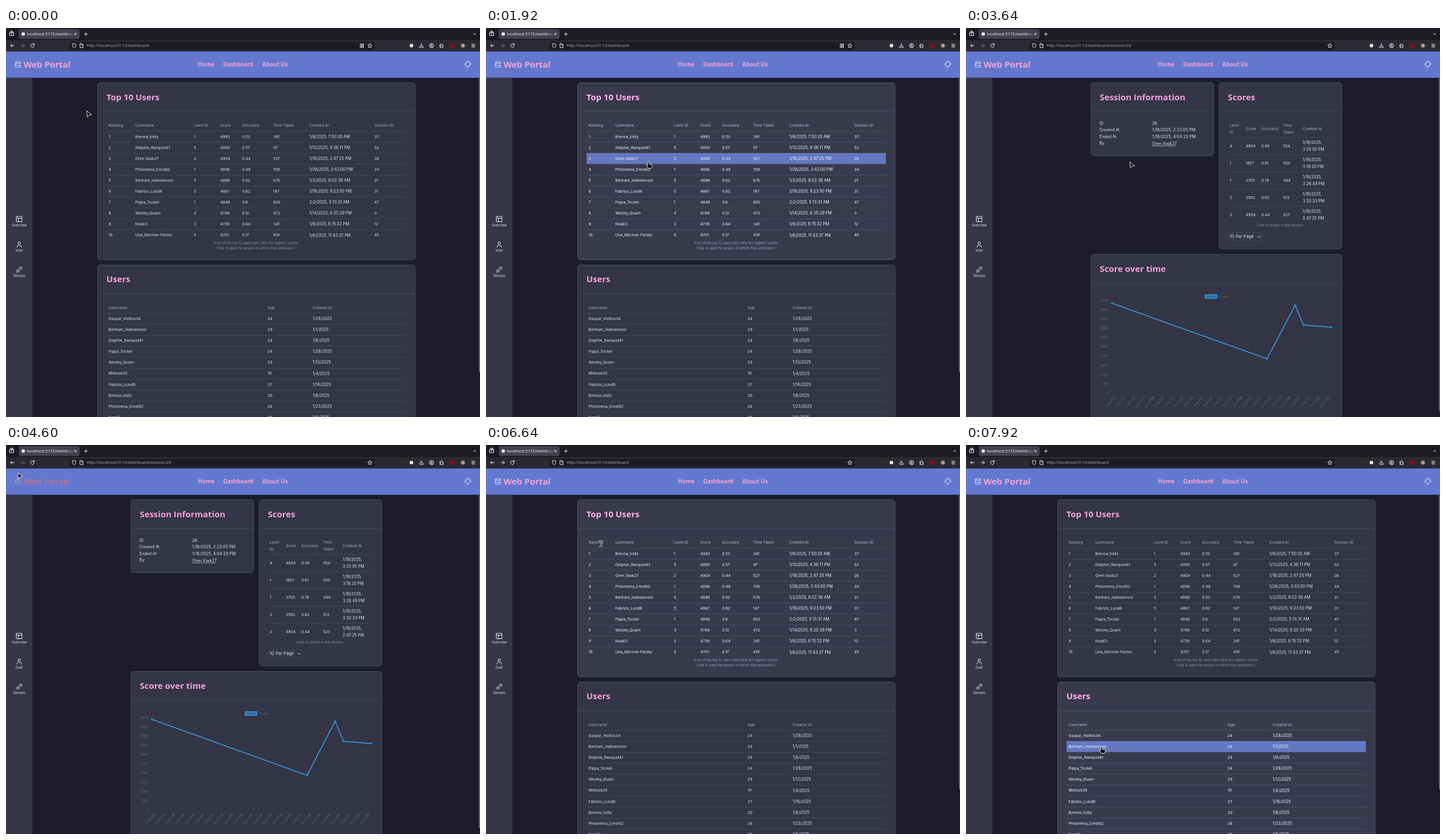
These frames come from a looping animation (825 by 678 pixels, 8000 ms). An HTML page:

```html
<!DOCTYPE html>
<html lang="en">
<head>
<meta charset="utf-8">
<title>Web Portal</title>
<style>
  html, body { margin: 0; width: 100%; height: 100%; overflow: hidden; background: #1c1c2b; }
  svg { display: block; width: 100%; height: 100%; }
  text { font-family: Inter, "Open Sans", sans-serif; white-space: pre; }
  .title { font-family: "Open Sans", "Noto Sans", sans-serif; font-weight: 700; }
  .ui { font-family: "Noto Sans", "Open Sans", sans-serif; }
  .axis { font-family: "Liberation Sans", Arial, sans-serif; }
  .icon { fill: none; stroke: #ececf2; stroke-width: 1; stroke-linecap: round; stroke-linejoin: round; }
  .rule { stroke: #494b5d; stroke-width: .8; }
</style>
</head>
<body>
<svg id="stage" viewBox="0 0 825 678"></svg>
<script>
const LOOP = 8000, OPEN = 3000, BACK = 5420, CHART = 2960, ROW = 19.1;
const PINK = '#f2a2db', LIGHT = '#e1e3f0', MUTED = '#abaec1', DIM = '#8d90a5', BLUE = '#36a2eb';
const $ = id => document.getElementById(id);

// y is the middle of the capitals
const text = (x, y, s, size = 6.7, fill = LIGHT, more = '') =>
  `<text x="${x}" y="${y + size * .36}" font-size="${size}" fill="${fill}" ${more}>${s}</text>`;
const title = (x, y, s, size = 14.85) => text(x, y, s, size, PINK, 'class="title"');
const middle = (x, y, s, size, fill) => text(x, y, s, size, fill, 'text-anchor="middle"');
const rect = (x, y, w, h, fill, more = '') =>
  `<rect x="${x}" y="${y}" width="${w}" height="${h}" fill="${fill}" ${more}/>`;
const rule = (x1, y, x2) => `<line class="rule" x1="${x1}" y1="${y}" x2="${x2}" y2="${y}"/>`;
const icon = (d, more = '') => `<path class="icon" d="${d}" ${more}/>`;

const cards = {
  dash: [[159, 95, 553.5, 309.5], [159, 412.5, 553.5, 300]],
  session: [[217, 95, 214.5, 128], [440, 95, 214.5, 290.5], [217, 394, 437.5, 300]]
};
const card = (page, i, name, body) => {
  const [x, y, w, h] = cards[page][i];
  return `<g id="${page}${i}">` +
    rect(x + .5, y + .5, w - 1, h - 1, '#343546', 'rx="5" stroke="#4b4d60"') +
    rule(x, y + 51, x + w) + title(x + 15.8, y + 25.3, name) + body + '</g>';
};

const topUsers = `Brenna_Voltz|1|4983|0.53|391|1/9/2025, 7:50:20 AM|37
Delphie_Ranquot41|5|4950|0.57|97|1/12/2025, 4:36:11 PM|52
Oren.Vask27|2|4904|0.44|527|1/18/2025, 2:47:25 PM|26
Philomena_Crest62|1|4896|0.48|706|1/28/2025, 3:43:00 PM|24
Bertram_Hallowmoor|5|4888|0.02|670|1/3/2025, 8:02:36 AM|21
Fabrizo_Lund8|5|4867|0.82|147|1/19/2025, 9:23:50 PM|31
Pippa_Tockel|1|4846|0.6|602|2/2/2025, 5:13:31 AM|47
Wesley_Quarn|3|4748|0.12|472|1/14/2025, 6:25:29 PM|3
Noa63|2|4739|0.64|341|1/9/2025, 6:15:32 PM|12
Una_Morrow-Fenley|5|4701|0.17|419|1/8/2025, 11:43:37 PM|45`
  .split('\n').map((r, i) => [i + 1, ...r.split('|')]);
const users = `Gaspar_Hollins34|24|1/29/2025
Bertram_Hallowmoor|29|1/1/2025
Delphie_Ranquot41|24|1/6/2025
Pippa_Tockel|24|1/29/2025
Wesley_Quarn|29|1/12/2025
Melisse29|19|1/4/2025
Fabrizo_Lund8|27|1/16/2025
Brenna_Voltz|20|1/6/2025
Philomena_Crest62|26|1/23/2025
Noa63|25|1/5/2025`.split('\n').map(r => r.split('|'));

// clickable rows, filled while the tables are built
const hot = [];
function table(y, cols, heads, rows) {
  let out = heads.map((h, i) => text(cols[i], y - 10.2, h, 6.7, MUTED)).join('');
  rows.forEach((r, n) => {
    const top = y + n * ROW;
    out += rule(175, top, 696.5) +
      rect(175, Math.floor(top), 521, 19, '#5d6db1', `id="row${hot.length}" opacity="0"`) +
      r.map((s, i) => text(cols[i], top + 9.1, s, /\//.test(s) ? 6.95 : 6.7)).join('');
    hot.push(top);
  });
  return out;
}

const dashPage = card('dash', 0, 'Top 10 Users',
    table(180, [178.5, 225, 327, 373, 411, 465, 528, 641],
      ['Ranking', 'Username', 'Level ID', 'Score', 'Accuracy', 'Time Taken', 'Created At', 'Session ID'], topUsers) +
    middle(435.5, 375, 'A list of the top 10 users who have the highest scores.', 5.8, DIM) +
    middle(435.5, 383.5, 'Click to view the session in which they achieved it.', 5.8, DIM)) +
  card('dash', 1, 'Users', table(497.4, [178.5, 455.3, 533.8], ['Username', 'Age', 'Created At'], users));

const info = [['ID', '26'], ['Created At', '1/18/2025, 2:23:05 PM'],
  ['Ended At', '1/18/2025, 4:04:20 PM'], ['By', 'Oren.Vask27']]
  .map(([k, v], i) => text(232.3, 166.3 + i * 11.55, k, 6.9) + text(324, 166.3 + i * 11.55, v, 7.1)).join('') +
  '<line x1="324" x2="365" y1="205.6" y2="205.6" stroke="#c9cbdb" stroke-width=".7"/>';

const scores = [[4, 4804, 0.94, 554, '3:25:05'], [1, 1857, 0.81, 550, '3:19:20'],
  [1, 3705, 0.78, 494, '3:26:49'], [2, 3592, 0.82, 513, '3:32:33'], [2, 4904, 0.44, 527, '2:47:25']];
const sCols = [459, 487, 514, 552, 586];
const head = (i, y, s) => text(sCols[i], y, s, 6.6, MUTED);
const scoreTable = head(0, 169.8, 'Level') + head(0, 181.3, 'ID') + head(1, 175.5, 'Score') +
  head(2, 175.5, 'Accuracy') + head(3, 169.8, 'Time') + head(3, 181.3, 'Taken') + head(4, 175.5, 'Created At') +
  scores.map((r, n) => {
    const y = 205.3 + n * 30;
    return rule(455.5, y - 14.5, 639) +
      r.slice(0, 4).map((s, i) => text(sCols[i], y, s)).join('') +
      text(sCols[4], y - 5.8, '1/18/2025,', 6.9) + text(sCols[4], y + 5.8, r[4] + ' PM', 6.9);
  }).join('') +
  middle(547, 344.3, 'A list of scores in this session.', 5.8, DIM) +
  rect(455.5, 357, 59, 13, 'none', 'rx="2" stroke="#4b4d60" stroke-width=".8"') +
  text(459, 363.5, '10 Per Page', 7.5) + icon('M508.2 363l1.8 1.8 1.8-1.8', 'stroke-width=".8"');

const minutes = s => { const [h, m, sec] = s.split(':').map(Number); return h * 60 + m + sec / 60; };
const first = minutes('2:47:25'), perMin = 382 / (minutes('3:32:33') - first);
const timeX = m => 254 + (m - first) * perMin;
const points = scores.map(r => [timeX(minutes(r[4])), r[1]]).sort((a, b) => a[0] - b[0]);
const valueY = v => 635.5 - v * 160.5 / 5000;
const grid = d => `<path d="${d}" stroke="#000" stroke-opacity=".1" stroke-width=".45"/>`;
let chart = rect(416.5, 465, 20, 6, BLUE, `fill-opacity=".5" stroke="${BLUE}" stroke-width="1.4"`) +
  text(439.5, 468, 'Score', 6.1, '#666', 'class="axis"');
for (let v = 0; v <= 5000; v += 500) {
  const y = valueY(v);
  chart += grid(`M250 ${y}H636`) +
    text(248, y, v.toLocaleString('en-US'), 6.1, '#666', 'class="axis" text-anchor="end"');
}
for (let m = 168; m <= 212; m += 2) {
  const x = timeX(m), label = `${m / 60 | 0}:${String(m % 60).padStart(2, '0')} PM`;
  chart += grid(`M${x} 475V639.5`) + `<g transform="translate(${x} 643) rotate(-50)">` +
    text(0, 0, label, 6.1, '#666', 'class="axis" text-anchor="end"') + '</g>';
}
chart += `<path id="curve" fill="none" stroke="${BLUE}" stroke-width="1.5" stroke-linejoin="round"/>` +
  points.map((p, i) => `<circle id="dot${i}" cx="${p[0]}" fill="#2b74aa" stroke="${BLUE}" stroke-width=".7"/>`).join('');

const sessionPage = card('session', 0, 'Session Information', info) +
  card('session', 1, 'Scores', scoreTable) + card('session', 2, 'Score over time', chart);

const browser = rect(0, 0, 825, 21, '#1c1b22') + rect(0, 21, 825, 20, '#2b2a33') +
  rect(22.5, 2, 105.5, 17, '#42414d', 'rx="2.5"') +
  rect(111, 24.3, 531, 13.2, '#1c1b22', 'rx="2.5"') +
  icon('M6.5 8.5h7v4.7h-7zM7 7h6M8 5.7h4M9 10.8h2') +
  '<circle cx="30" cy="10.6" r="3" fill="#ececf2"/>' +
  '<linearGradient id="fade" gradientUnits="userSpaceOnUse" x1="105" x2="119"><stop stop-color="#f2f2f7"/><stop offset="1" stop-color="#42414d"/></linearGradient>' +
  text(36.5, 10.5, 'localhost:5173/dashboar', 7.15, 'url(#fade)', 'class="ui"') +
  icon('M119.3 8.8l3.4 3.4M122.7 8.8l-3.4 3.4', 'stroke-width=".9"') +
  icon('M136.3 10.7h5.4M139 8v5.4M813.3 9.5l2.2 2.2 2.2-2.2') +
  rect(4, 23, 15, 15, '#fff', 'id="backBg" rx="2" opacity="0"') +
  icon('M14.3 30.7H8M10.7 28L8 30.7l2.7 2.7') +
  icon('M26 30.7h6.3M29.6 28l2.7 2.7-2.7 2.7', 'id="forward"') +
  icon('M48.7 28.7A3.2 3.2 0 1 0 49.2 31.4M49.2 27.3v2.2h-2.2') +
  icon('M118.5 27l3 1.1v2.4q0 2.7-3 4-3-1.3-3-4v-2.4z', 'stroke-width=".8"') +
  icon('M129.2 27.2h3l2 2v5h-5zM132 27.4v2h2', 'stroke-width=".8"') +
  `<text id="url" class="ui" x="140.5" y="33.2" font-size="7.15" fill="#a3a3ab"></text>` +
  icon('M617 27.7h5.4v6h-5.4zM618.4 29.5h2.6M618.4 31h2.6M618.4 32.4h1.4', 'id="reader" stroke-width=".8"') +
  icon('M633.3 27l1.1 2.4 2.6.3-1.9 1.8.5 2.6-2.3-1.3-2.3 1.3.5-2.6-1.9-1.8 2.6-.3z', 'stroke-width=".8"') +
  '<circle cx="705.7" cy="30.6" r="3.2" fill="#ececf2"/>' +
  icon('M723 27v4.4M721 29.6l2 2 2-2M719.8 32v1.7h6.4V32') +
  icon('M737 30.7a3.6 3.6 0 1 0 7.2 0 3.6 3.6 0 1 0-7.2 0M739.4 29.8a1.2 1.2 0 1 0 2.4 0 1.2 1.2 0 1 0-2.4 0M738.5 33q2.1-1.8 4.2 0', 'stroke-width=".9"') +
  icon('M755.2 29.4h1.6v-.8a1 1 0 0 1 2 0v.8h1.9v4.6h-5.5v-1.6h.7a.9.9 0 0 0 0-1.8h-.7z', 'stroke-width=".9"') +
  rect(773, 27.6, 6.4, 6.4, '#8c0d16', 'rx=".6"') +
  '<circle cx="795.2" cy="30.7" r="3.4" fill="#b09a86"/>' +
  icon('M810.6 28.4h5.4M810.6 30.7h5.4M810.6 33h5.4', 'stroke-width=".9"');

const shell = rect(0, 41, 825, 45.8, '#6478cf') + rect(0, 86.8, 46, 592, '#343545') +
  '<g id="brand">' +
  icon('M16.5 60c0-2 8.6-2 8.6 0s-8.6 2-8.6 0v7c0 1 1.8 1.5 3.6 1.6M25.1 60v2M16.5 63.5c0 1 1.5 1.5 3.2 1.6M26 65.5h-4.2M23.2 63.9l-1.5 1.6 1.5 1.6M25.1 68.2l-2 .4') +
  title(30.5, 63.7, 'Web Portal', 14.95) + '</g>' +
  title(334, 63.4, 'Home', 9.7) + title(378, 63.4, 'Dashboard', 9.7) + title(446, 63.4, 'About Us', 9.8) +
  icon('M804 58.2a5 5 0 1 0 0 10q1.6 0 1.2-1.7-.4-1.7 1.3-1.7h1.3q1.3 0 1.3-1.6a5 5 0 0 0-5.1-5M801 64h.1M801.6 61.3h.1M804.2 60.3h.1M806.7 61.8h.1') +
  icon('M18.3 328.3h9.4v9.4h-9.4zM18.3 331.5h9.4M21.6 331.5v6.2') + middle(23, 343.7, 'Overview', 5.8) +
  icon('M20.9 374.6a2.1 2.1 0 1 0 4.2 0 2.1 2.1 0 1 0-4.2 0M19.2 382v-1q0-2.2 2.2-2.2h3.2q2.2 0 2.2 2.2v1') + middle(23, 388, 'User', 5.8) +
  icon('M19 5l3-3M2 22l3-3M6.3 20.3a2.4 2.4 0 0 0 3.4 0L12 18l-6-6-2.3 2.3a2.4 2.4 0 0 0 0 3.4zM7.5 13.5L10 11M10.5 16.5L13 14M12 6l6 6 2.3-2.3a2.4 2.4 0 0 0 0-3.4l-2.6-2.6a2.4 2.4 0 0 0-3.4 0z',
    'transform="translate(17 415.2) scale(.5)" style="stroke-width:2"') +
  middle(23, 432, 'Session', 5.8) +
  rect(823.3, 87.5, 1.7, 513, '#6f668e', 'id="bar" rx=".8"');

const edge = 'fill="#000" stroke="#fff" stroke-width=".9" stroke-linejoin="round"';
const pointer = '<g id="pointer">' +
  `<path id="arrow" ${edge} d="M.5.5L9 7 4.5 7.6 1.5 11.3Z"/>` +
  `<path id="hand" ${edge} d="M-1.3 1.2a1.3 1.3 0 0 1 2.6 0V4.2L5 5q1.6.4 1.5 2L6 9.6Q5.6 11.5 4 11.5H1Q-.3 11.5-1.2 10L-3.6 6.6q-.6-1.3.6-1.5L-1.3 6Z"/>` +
  '<g id="beam" fill="none"><path stroke="#fff" stroke-width="2.2" d="M-2.8-5h5.6M0-5V5M-2.8 5h5.6"/>' +
  '<path stroke="#000" stroke-width="1" d="M-2.3-5h4.6M0-5V5M-2.3 5h4.6"/></g></g>';

$('stage').innerHTML = rect(0, 0, 825, 678, '#1c1c2b') +
  `<g id="dash">${dashPage}</g><g id="session">${sessionPage}</g>` + shell + browser + pointer;

// time, x, y of the pointer tip
const path = [[240, 140, 144], [720, 182, 154], [1120, 240, 185], [1520, 272, 214], [1920, 283, 233],
  [3880, 285, 233], [4360, 75, 80], [4480, 45, 66], [4560, 28, 57], [4600, 20, 48], [4760, 9, 30],
  [4840, 8.5, 29.5], [6000, 8.5, 29.5], [6240, 66, 76], [6640, 200, 172], [6880, 215, 262],
  [7200, 239, 407], [7520, 238, 470], [7760, 236, 512], [7920, 236, 526]];
function place(t) {
  const i = path.findIndex(p => p[0] > t);
  if (i < 0) return path[path.length - 1].slice(1);
  if (!i) return path[0].slice(1);
  const [t0, x0, y0] = path[i - 1], [t1, x1, y1] = path[i], k = (t - t0) / (t1 - t0);
  return [x0 + (x1 - x0) * k, y0 + (y1 - y0) * k];
}
const onSession = t => t >= OPEN && t < BACK;
const inside = ([px, py], [x, y, w, h]) => px >= x && px < x + w && py >= y && py < y + h;
// 0..1 hover transition: share of the last 200 ms spent in the box
const level = (t, box) => [0, 40, 80, 120, 160].filter(d => inside(place(t - d), box)).length / 5;
const bright = (id, v) => $(id).style.filter = v === 1 ? 'none' : `brightness(${v})`;
const show = (id, on) => $(id).setAttribute('display', on ? 'inline' : 'none');
const rowBox = y => [175, y, 521.5, ROW];
const brandBox = [15, 55, 97, 18], backBox = [4, 23, 15, 15], headBox = [178, 163, 26, 14];

function draw(now) {
  const shift = onSession(now) ? 40 : 0;
  const t = Math.floor((now - shift) / 80) * 80 + shift;
  const session = onSession(now), page = session ? 'session' : 'dash';
  const at = place(t);

  show('dash', !session);
  show('session', session);
  show('reader', now < OPEN);
  $('url').textContent = 'http://localhost:5173/dashboard' + (session ? '/session/26' : '');
  $('forward').setAttribute('opacity', now >= BACK ? 1 : .35);
  $('bar').setAttribute('height', session ? 580.5 : 513);

  cards[page].forEach((box, i) => bright(page + i, 1 + .09 * level(t, box)));
  bright('brand', 1 - .36 * level(t, brandBox));
  const pressed = now >= 5170 && now < BACK;
  $('backBg').setAttribute('opacity', inside(at, backBox) ? (pressed ? .28 : .15) : 0);

  let hand = inside(at, brandBox);
  if (!session) hot.forEach((y, i) => {
    const over = inside(at, rowBox(y));
    hand = hand || over;
    $('row' + i).setAttribute('opacity', over ? 1 : 0);
  });
  else {
    const grow = 1 - (1 - Math.min(1, (t - CHART) / 1000)) ** 4;
    $('curve').setAttribute('d', 'M' + points.map(([x, v]) => `${x} ${valueY(v * grow)}`).join('L'));
    points.forEach(([, v], i) => {
      $('dot' + i).setAttribute('cy', valueY(v * grow));
      $('dot' + i).setAttribute('r', 1.3 * grow);
    });
  }
  const beam = !session && inside(at, headBox);
  show('hand', hand);
  show('beam', beam);
  show('arrow', !hand && !beam);
  $('pointer').setAttribute('transform', `translate(${at})`);
}

function tick() {
  draw(performance.now() % LOOP);
  requestAnimationFrame(tick);
}
tick();
</script>
</body>
</html>
```
